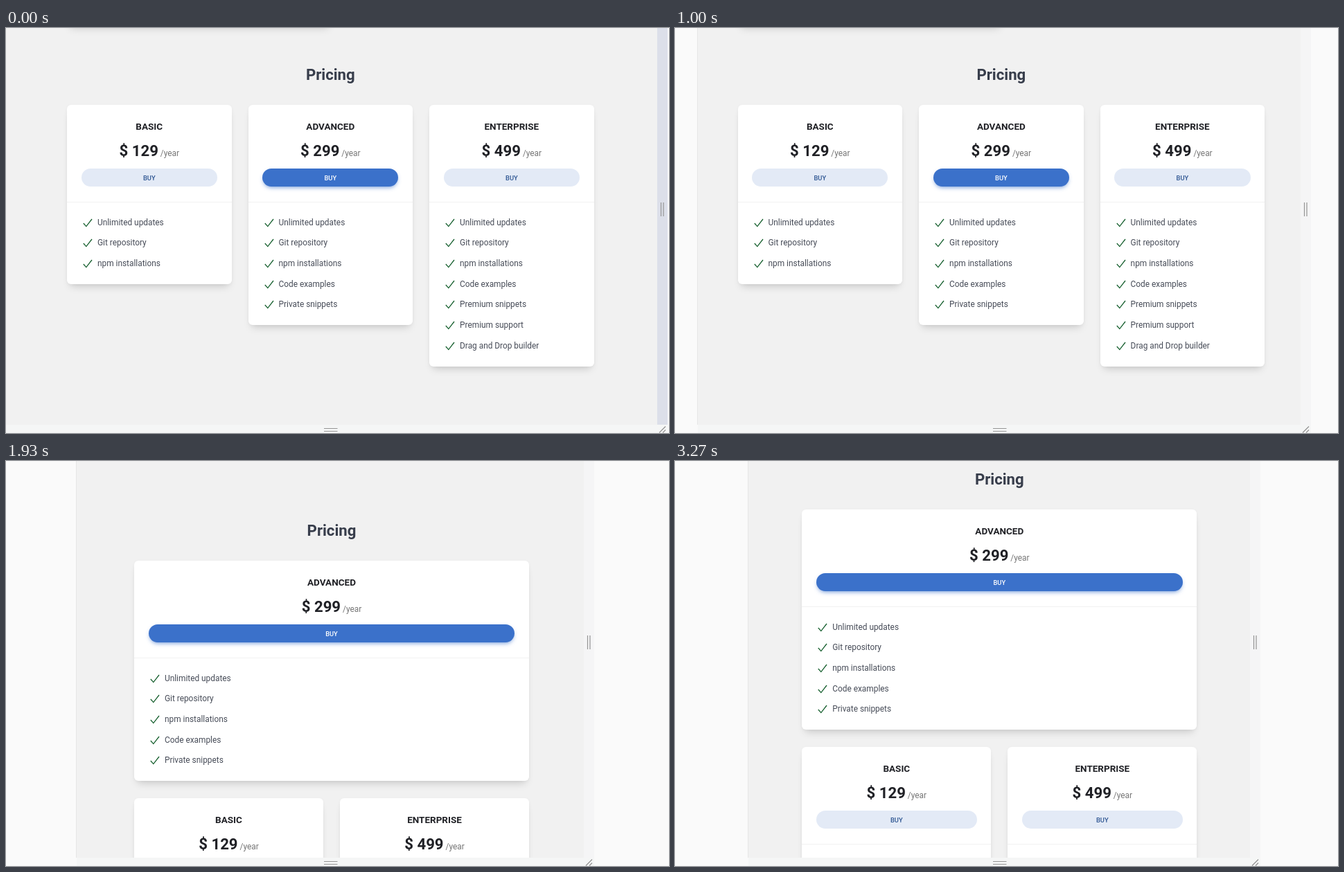
Write an HTML page that moves like this. It is 957 px wide and 585 px high and loops after 4.27 s.

```html
<!DOCTYPE html>
<html lang="en">
<head>
<meta charset="utf-8">
<title>Responsive pricing</title>
<style>
html, body { margin: 0; width: 100%; height: 100%; overflow: hidden; background: #fafafa; }
body { position: relative; font: 11.875px/20px Roboto, sans-serif; color: #474c58; }
div, svg { position: absolute; box-sizing: border-box; white-space: nowrap; }
#page { left: 0; top: 0; width: 957px; height: 585px; overflow: hidden; background: #f1f1f1; }
#bar { top: 573px; height: 12px; background: #f5f6f6; }
#grip { top: 0; width: 15px; height: 573px; background: #f5f5f6; }
#edge { top: 0; width: 1px; height: 573px; background: #e6e6e6; }
#thumb { left: 825px; width: 2px; height: 174px; background: #a6a6a6; }
#above { width: 382px; top: -30px; height: 27px; }
#heading { width: 200px; text-align: center; font: 700 22.17px/30px Roboto, sans-serif; color: #373d4b; }
.card { background: #fff; border-radius: 6px; }
.card, #above { box-shadow: 0 8px 12px -5px rgba(0,0,0,.17), 0 1px 5px rgba(0,0,0,.04); }
.name, .price { left: 0; right: 0; text-align: center; color: #202126; font-weight: 700; }
.name { top: 21px; font-size: 13.5px; }
.price { top: 51px; font-size: 22.17px; line-height: 30px; }
.price small { font-size: 11.875px; font-weight: 400; color: #757575; }
.buy { left: 20.6px; right: 20.6px; top: 92px; height: 26.5px; border-radius: 14px; text-align: center;
  font-size: 9.3px; font-weight: 500; line-height: 27px; background: #e3eaf6; color: #2c5491; }
.main .buy { background: #3b71ca; color: #fff; box-shadow: 0 3px 6px -2px rgba(59,113,202,.75); }
.rule { left: 0; right: 0; top: 140px; height: 1px; background: #f1f1f1; }
.item { left: 44px; }
.item svg { left: -21px; top: 4px; }
</style>
</head>
<body>
<div id="page">
  <div id="above"></div>
  <div id="heading">Pricing</div>
  <div id="thumb"></div>
</div>
<div id="bar"></div>
<div id="grip"></div>
<div id="edge"></div>
<svg width="957" height="585" fill="none" stroke="#949494" stroke-width="1.2">
  <path d="M459 578.5h19.500M459 582.5h19.500"/>
  <path id="handles" d="M-1.500 252v20M2 252v20M-4 584.500l9-9M1 584.500l4-4"/>
</svg>
<script>
const $ = id => document.getElementById(id);
const LOOP = 4270, STEP = 200 / 3, SWITCH = 1600, ROW = 29.7, GAP = 24;

const common = ['Unlimited updates', 'Git repository', 'npm installations'];
const plans = [
  ['BASIC', 129, common],
  ['ADVANCED', 299, [...common, 'Code examples', 'Private snippets']],
  ['ENTERPRISE', 499, [...common, 'Code examples', 'Premium snippets', 'Premium support', 'Drag and Drop builder']]
];
const check = '<svg width="15" height="13"><path d="M.8 7l4 4.600L13 1" fill="none" stroke="#17602f" stroke-width="1.3"/></svg>';

const cards = plans.map(([name, price, items], i) => {
  const card = document.createElement('div');
  card.className = i === 1 ? 'card main' : 'card';
  card.style.height = 200 + ROW * (items.length - 1) + 'px';
  card.innerHTML = `<div class="name">${name}</div>
    <div class="price">$ ${price}<small> /year</small></div>
    <div class="buy">BUY</div><div class="rule"></div>` +
    items.map((text, k) => `<div class="item" style="top:${160 + ROW * k}px">${check}${text}</div>`).join('');
  $('page').insertBefore(card, $('thumb'));
  return card;
});

// Piecewise linear value through [time, value] points
function track(points, t) {
  const i = points.findIndex(p => p[0] >= t);
  if (i < 0) return points[points.length - 1][1];
  if (i === 0) return points[0][1];
  const [t0, v0] = points[i - 1], [t1, v1] = points[i];
  return v0 + (v1 - v0) * (t - t0) / (t1 - t0);
}

const handleX = [[333, 947], [400, 941], [733, 925], [867, 918], [1200, 898],
  [1400, 883], [1533, 870], [1933, 841], [2267, 837]];
const middle = [[333, 468.3], [400, 471], [467, 472], [733, 472], [1200, 470], [1933, 470], [2267, 468.3]];
const scrollY = [[2400, 100], [2467, 88], [2533, 63], [2600, 38], [2667, 26]];
const thumbAlpha = [[3000, 1], [3067, .66], [3133, .33], [3200, .33], [3267, 0]];

function place(el, x, y, w) {
  el.style.left = x + 'px';
  if (y !== null) el.style.top = y + 'px';
  if (w) el.style.width = w + 'px';
}

function draw(time) {
  const t = Math.floor((time % LOOP + 4) / STEP) * STEP;
  const h = Math.round(track(handleX, t)), left = Math.max(0, 943 - h), right = h - 7;
  const mid = track(middle, t), wide = t < SWITCH - 1;
  const y = wide ? 67 : track(scrollY, t), top = y + 43.7;

  $('page').style.clipPath = `inset(0 ${957 - right}px 12px ${left}px)`;
  place($('bar'), left, null, h + 8 - left);
  place($('grip'), right, null);
  $('grip').style.background = t < 399 ? '#dcdfe9' : '';
  place($('edge'), left - 1, null);
  $('handles').setAttribute('transform', `translate(${h} 0)`);

  place($('heading'), mid - 100, y - 15);
  place($('above'), mid - 380, null);
  $('above').style.display = wide ? '' : 'none';

  const total = wide ? 760.6 : 570;
  const x = mid - total / 2, cols = wide ? 3 : 2;
  const w = (total - GAP * (cols - 1)) / cols;
  if (wide) cards.forEach((card, i) => place(card, x + i * (w + GAP), top, w));
  else {
    const below = top + 200 + ROW * 4 + GAP;
    place(cards[1], x, top, total);
    place(cards[0], x, below, w);
    place(cards[2], x + w + GAP, below, w);
  }

  $('thumb').style.top = 305 - (y - 26) * 11 / 37 + 'px';
  $('thumb').style.opacity = t < 2466 ? 0 : track(thumbAlpha, t);
}

const start = performance.now();
(function tick() {
  draw(performance.now() - start);
  requestAnimationFrame(tick);
})();
</script>
</body>
</html>
```
